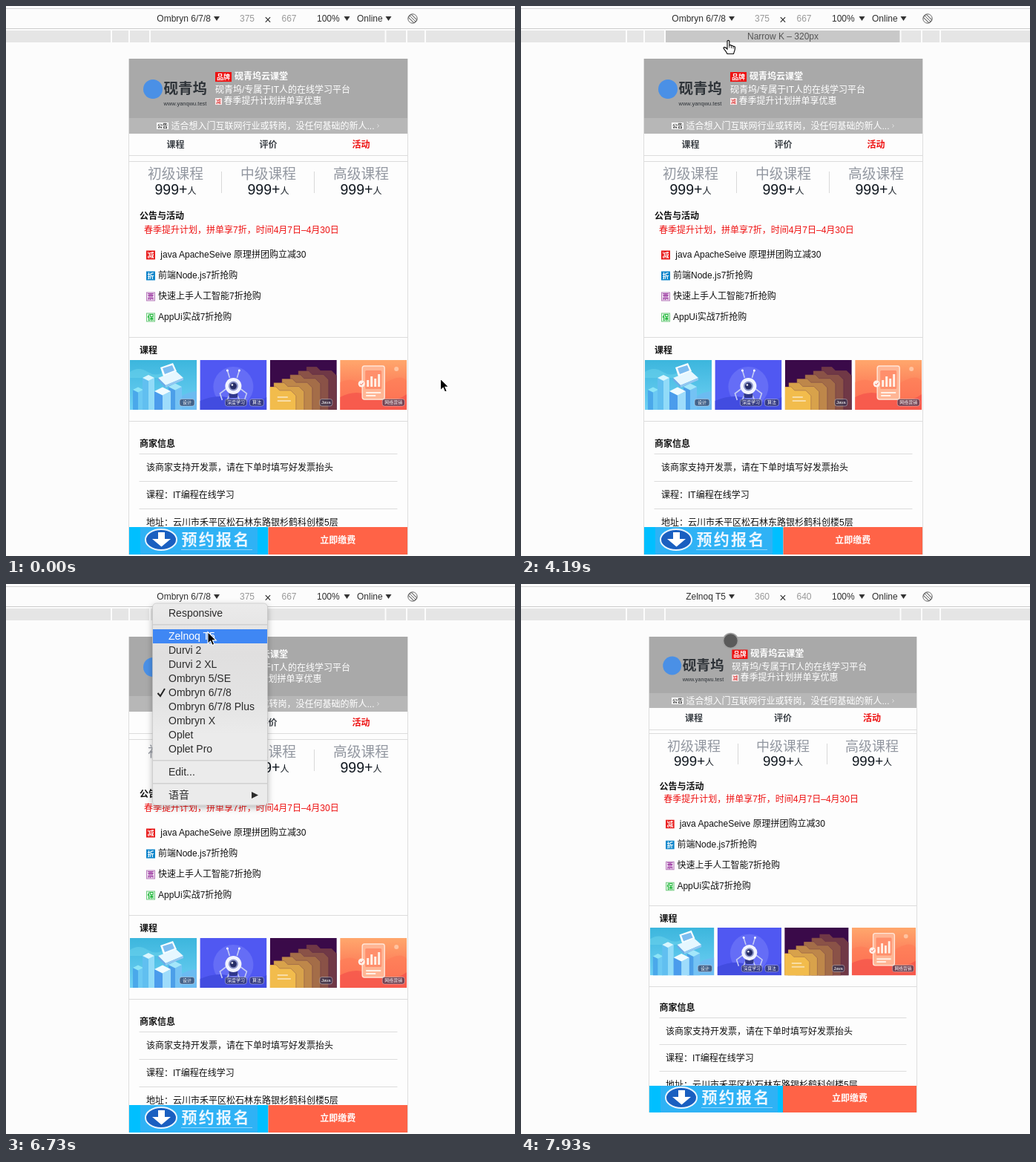
Recreate the animation shown at these times as an HTML page. Size 686 by 741 pixels, loop 8000 ms.

```html
<!DOCTYPE html>
<html lang="zh-CN">
<head>
<meta charset="utf-8">
<title>Device preview</title>
<style>
html, body { margin: 0; width: 100%; height: 100%; overflow: hidden; background: #fcfcfc; }
svg { display: block; width: 100%; height: 100%; }
text { font-family: "Liberation Sans", "Noto Sans CJK SC", "Noto Sans CJK", sans-serif; white-space: pre; }
</style>
</head>
<body>
<svg id="stage" viewBox="0 0 686 741"></svg>
<script>
const LOOP = 8000;
const $ = id => document.getElementById(id);

// y is the visual middle of the line
const text = (x, y, str, fill = '#111', size = 12, more = '') =>
  `<text x="${x}" y="${y + size * .37}" fill="${fill}" font-size="${size}" ${more}>${str}</text>`;
const rect = (x, y, w, h, fill, more = '') =>
  `<rect x="${x}" y="${y}" width="${w}" height="${h}" fill="${fill}" ${more}/>`;
const poly = (pts, fill, more = '') => `<polygon points="${pts}" fill="${fill}" ${more}/>`;
const circle = (x, y, r, fill, more = '') => `<circle cx="${x}" cy="${y}" r="${r}" fill="${fill}" ${more}/>`;
const path = (d, fill, more = '') => `<path d="${d}" fill="${fill}" ${more}/>`;
const group = (inner, more = '') => `<g ${more}>${inner}</g>`;
const down = (x, y) => poly(`${x},${y} ${x + 8},${y} ${x + 4},${y + 6}`, '#333');
const grad = (id, a, b) => `<linearGradient id="${id}" x2="0" y2="1"><stop stop-color="${a}"/><stop offset="1" stop-color="${b}"/></linearGradient>`;
const MID = 'text-anchor="middle"', BOLD = 'font-weight="700"', MEDIUM = 'font-weight="500"';

/* course pictures, 90 x 67 each */
const pill = (x, w, str) =>
  rect(x, 52.5, w, 9.5, '#2b3050', 'rx="3" fill-opacity=".65" stroke="#fff" stroke-opacity=".6" stroke-width=".6"') +
  text(x + w / 2, 57.2, str, '#fff', 6, MID);

const tower = (x, y, w, h, top, left, right) => {
  const q = w / 4, m = x + w / 2;
  return poly(`${x},${y} ${m},${y + q} ${m},${y + q + h} ${x},${y + h}`, left) +
    poly(`${m},${y + q} ${x + w},${y} ${x + w},${y + h} ${m},${y + q + h}`, right) +
    poly(`${x},${y} ${m},${y - q} ${x + w},${y} ${m},${y + q}`, top);
};

const design = () =>
  rect(0, 0, 90, 67, 'url(#sky)') +
  path('M0 16Q12 8 24 16T48 14V24H0z', '#6fd6ee', 'opacity=".5"') +
  path('M52 67Q66 44 90 42V67z', '#6fb8f3', 'opacity=".8"') +
  tower(4, 40, 14, 34, '#8de4f6', '#4aa8ea', '#6cc9f3') +
  tower(17, 24, 16, 50, '#d8f6ff', '#61bff0', '#91dbf8') +
  tower(52, 36, 18, 40, '#a4e6fa', '#4c9fe9', '#74c2f4') +
  tower(33, 42, 22, 40, '#f0fbff', '#4b9cec', '#9edcfb') +
  poly('38,24 62,15 72,24 48,34', '#e6f7ff') + poly('38,24 48,34 48,37 38,27', '#6da9e8') +
  poly('48,34 72,24 72,27 48,37', '#93c6f1') + poly('41,10 58,4 63,15 45,22', '#f6fdff') +
  poly('44,11 57,7 60,14 47,19', '#7cbcf0') + pill(67, 20, '设计');

const robot = () =>
  rect(0, 0, 90, 67, '#5058f2') + circle(45, 36, 27, '#656df6') +
  path('M0 55Q25 44 45 53T90 50V67H0z', '#424ce0') +
  path('M40 24L37 14M50 24L53 14M35 39L27 45L30 54M55 39L63 45L60 54M40 46L36 56M50 46L54 56', 'none', 'stroke="#c4ccf4" stroke-width="1.6"') +
  circle(37, 14, 1.5, '#fff') + circle(53, 14, 1.5, '#fff') +
  rect(39, 43, 12, 8, '#30378c', 'rx="3"') + circle(45, 35, 11, '#f1f3ff') +
  circle(45, 35, 6.5, '#8a93c8') + circle(45, 35, 4.5, '#262d66') + circle(43.5, 33.5, 1.3, '#fff') +
  pill(34, 29, '深度学习') + pill(67, 19, '算法');

const folders = () => {
  let out = rect(0, 0, 90, 67, '#3a0a49');
  for (let i = 5; i >= 0; i--) {
    const x = i * 11 - 6, y = 36 - i * 5.4, f = i / 5;
    const tone = `rgb(${242 - 130 * f},${188 - 132 * f},${76 - 6 * f})`;
    out += path(`M${x} 70V${y}H${x + 14}L${x + 19} ${y + 5}H${x + 34}L${x + 41} ${y + 12}V70z`, tone, 'stroke="#3a0a49" stroke-opacity=".25"');
  }
  return out + rect(10, 49, 14, 2, '#fff', 'opacity=".5"') + rect(10, 54, 18, 2, '#fff', 'opacity=".5"') + pill(67, 17, 'Java');
};

const market = () =>
  rect(0, 0, 90, 67, 'url(#dusk)') +
  path('M0 30Q14 22 28 32T62 30T90 28V67H0z', '#ff7c58', 'opacity=".6"') +
  path('M0 50Q22 38 45 50T90 46V67H0z', '#f6524a', 'opacity=".7"') +
  rect(30, 8, 30, 45, '#ffb594', 'rx="3" stroke="#ffe6d8" stroke-width="1.4"') +
  rect(34, 14, 22, 25, '#ff8f6c', 'rx="1.5"') +
  [9, 14, 11, 17].map((h, i) => rect(36 + i * 5, 36 - h, 3, h, '#fff0e6')).join('') +
  rect(35, 43, 20, 2, '#fff0e6') + rect(35, 47, 13, 2, '#fff0e6') +
  circle(29, 32, 4.5, '#fff1e9') + path('M27 32l1.6 1.7 2.8-3.2', 'none', 'stroke="#f2644e"') +
  circle(76, 12, 3, '#ffc3a0') + pill(57, 30, '网络营销');

const ART = [design, robot, folders, market];

/* the shop page: small = relaid out at the narrower root size */
function page(id, x, w, bottom, small) {
  const y = (a, b) => small ? b : a;
  const s = small ? .96 : 1;
  const X = a => x + a * s;
  const mid = x + w / 2;
  const line = (a, b, inset = 0) => rect(x + inset, y(a, b), w - 2 * inset, 1, '#dcdcdc');
  const tag = (a, yc, size, ch, fill, ink, edge = fill) =>
    rect(X(a) + .5, yc - size / 2 + .5, size - 1, size - 1, fill, `stroke="${edge}"`) +
    text(X(a) + size / 2, yc, ch, ink, size * .75, `${MID} ${BOLD}`);

  let out = rect(x, 71, w, bottom - 71, '#fdfdfd');

  out += rect(x, 71, w, y(80, 76), '#a9a9a9') + rect(x, y(151, 147), w, y(21, 20), '#b7b7b7') +
    circle(X(32), y(112, 110), 13 * s, '#4a90e6') +
    text(X(46.5), y(111, 109), '砚青坞', '#2e3338', 19.5 * s, BOLD) +
    text(X(46.5), y(131.5, 128.5), 'www.yanqwu.test', '#2e3338', 7.5 * s) +
    rect(X(116), y(89, 88.5), 22 * s, 13 * s, '#ee1111') +
    text(X(127), y(95.5, 95), '品牌', '#fff', 9 * s, `${MID} ${BOLD}`) +
    text(X(142), y(95, 94), '砚青坞云课堂', '#fff', 12, BOLD) +
    text(X(116), y(113, 112), '砚青坞/专属于IT人的在线学习平台', '#fff', 12, MEDIUM) +
    tag(116, y(128.5, 126.5), 9, '减', '#fbeeee', '#d44') +
    text(X(127.5), y(128, 126), '春季提升计划拼单享优惠', '#fff', 12, MEDIUM) +
    rect(203, y(157, 153), 16, 9, '#fff') + text(211, y(161.5, 157.5), '公告', '#333', 7, `${MID} ${BOLD}`) +
    text(222.5, y(162, 158), '适合想入门互联网行业或转岗，没任何基础的新人...', '#fff', 12, MEDIUM) +
    path(`M500.5 ${y(159.5, 155.5)}l2 2-2 2`, 'none', 'stroke="#e4e4e4"');

  ['课程', '评价', '活动'].forEach((name, i) => {
    const c = x + w * (2 * i + 1) / 6;
    out += text(c, y(187, 181), name, i == 2 ? '#ee1111' : '#3a3f45', 12, `${MID} ${BOLD}`) +
      text(c, y(226.5, 218.5), '初中高'[i] + '级课程', '#9297a0', 18.75 * s, MID) +
      text(c, y(247, 238.5), '999+<tspan font-size="12">人</tspan>', '#111820', 19.5 * s, MID);
    if (i) out += rect(Math.round(x + w * i / 3) - 1, y(223, 215), 1, y(29, 28), '#d8d8d8');
  });
  out += line(201, 196) + line(209, 201);

  out += text(X(14), y(283, 272.5), '公告与活动', '#111', 12, BOLD) +
    text(X(20), y(302, 290), '春季提升计划，拼单享7折，时间4月7日–4月30日', '#ee1111');
  [
    ['减', '#e81c1c', '#fff', ' java ApacheSeive 原理拼团购立减30'],
    ['折', '#0d86cb', '#fff', '前端Node.js7折抢购'],
    ['票', '#f0e4f2', '#9b35a0', '快速上手人工智能7折抢购', '#b87cbc'],
    ['保', '#e6f7e8', '#22b83c', 'AppUi实战7折抢购', '#72cc80'],
  ].forEach(([ch, fill, ink, str, edge], i) => {
    const row = y(335, 323) + i * 28;
    out += tag(23, row + .5, 12 * s, ch, fill, ink, edge) + text(X(39), row, str);
  });

  out += line(446, 433) + text(X(14), y(464, 451), '课程', '#111', 12, BOLD);
  ART.forEach((art, i) => {
    const left = small ? 174 + i * 90.6 : (w == 375 ? 167 : 166.3) + i * 94.4;
    out += `<use href="#art${i}" transform="translate(${left} ${y(477, 463)}) scale(${s})"/>`;
  });
  out += line(559, 542);

  out += text(X(14), y(590, 571), '商家信息', '#111', 12, BOLD);
  ['该商家支持开发票，请在下单时填写好发票抬头', '课程：IT编程在线学习', '地址：云川市禾平区松石林东路银杉鹤科创楼5层'].forEach((str, i) => {
    out += line(603 + i * 37, 584 + i * 36, 13.5) + text(X(23), y(622, 603) + i * y(37, 36), str);
  });

  const top = bottom - 37 + (small ? 1 : 0), fy = bottom - 20;
  out += rect(x, top, w / 2, 37, '#00bfff') + rect(x + 15, top, 158, 37, '#2fb2f5') +
    `<ellipse cx="${x + 43}" cy="${fy}" rx="21" ry="14" fill="#1a5fc0" stroke="#e8f5ff" stroke-width="2"/>` +
    path(`M${x + 39} ${fy - 10}h9v9h8l-12.500 10.500-12.500-10.500h8z`, '#fff') +
    rect(x + 70, fy + 13, 96, 1, '#8fd4fa') +
    text(x + 70.5, fy - 1, '预约报名', '#eaf6ff', 21, `${BOLD} letter-spacing="2.3"`) +
    rect(mid, top, w / 2, 37, '#ff6347') +
    text(x + w * .75, bottom - 19, '立即缴费', '#fff', 12, `${MID} ${BOLD}`);

  out += path(`M${x - .5} 71V${bottom}M${x + w + .5} 71V${bottom}`, 'none', 'stroke="#dedede"');
  return `<clipPath id="${id}Clip">${rect(x - 1, 70.5, w + 2, bottom - 70.5, '#000')}</clipPath>` +
    group(out, `id="${id}" clip-path="url(#${id}Clip)"`);
}

/* browser chrome */
function chrome() {
  let out = rect(0, 3, 686, 1, '#d4d4d4') + rect(0, 30, 686, 1, '#cccccc') + rect(0, 33, 686, 16, '#e5e5e5') +
    group(rect(195, 33, 316, 16, '#c8c8c8'), 'id="band"') +
    text(353, 41, 'Narrow K – 320px', '#555', 12, `${MID} id="bandName"`);
  [142, 166, 194, 511.5, 540, 565].forEach(x => out += rect(x - 1, 33, 2, 16, '#fcfcfc'));
  out += text(276, 17, '', '#303030', 12, 'text-anchor="end" id="device"') + down(280, 14) +
    text(325, 17, '', '#999', 12, `${MID} id="wide"`) + text(353, 18, '×', '#333', 16, MID) +
    text(381.5, 17, '', '#999', 12, `${MID} id="tall"`) +
    text(419, 17, '100%', '#303030') + down(455.5, 14) + text(473, 17, 'Online', '#303030') + down(511.5, 14) +
    group(circle(548, 17, 6.2, 'none') + rect(545.2, 11.5, 5.6, 11, 'none', 'rx="1" transform="rotate(-45 548 17)"') +
      path('M544 13l8 8', 'none'), 'stroke="#666"');
  return out;
}

/* device menu */
const ROWS = ['Responsive', 'Zelnoq T5', 'Durvi 2', 'Durvi 2 XL', 'Ombryn 5/SE', 'Ombryn 6/7/8', 'Ombryn 6/7/8 Plus',
  'Ombryn X', 'Oplet', 'Oplet Pro', 'Edit...', '语音'];
const rowY = i => i == 0 ? 39 : i < 10 ? 51 + i * 19 : 253 + (i - 10) * 31;

function menu() {
  let out = rect(197.5, 26, 155, 272, 'url(#glass)', 'rx="5" stroke="#bdbdbd" stroke-width=".6" filter="url(#shade)"') +
    rect(198, 0, 154, 19, '#3f87f4', 'id="hot"');
  [55, 238, 269].forEach(y => out += rect(198, y - 1, 154, 1.5, '#d0d0d0'));
  ROWS.forEach((name, i) => out += text(219, rowY(i), name, '#2b2b2b', 14, `id="row${i}"`));
  return out + path('M204.500 147l3.500 4 6-10', 'none', 'stroke="#222" stroke-width="2"') + poly('331,280 340,284.500 331,289', '#2b2b2b');
}

const ARROW = path('M0 0V15.800L3.600 12.500L6 18L8.800 16.800L6.400 11.400H11.300z', '#000', 'stroke="#fff" stroke-width="1.1"');
const HAND = path('M-1.500 1C-1.500-.6 1.300-.6 1.300 1V6.500C2.200 5.600 4 6 4 7.200C5 6.400 6.500 7 6.500 8.200C7.600 7.600 9 8.200 9 9.600C9 14 7.500 15 7 18H-1.500C-2.500 15-5.500 12.500-6.500 10.200C-6.500 8.500-4 8.600-1.500 11.500z',
  '#fff', 'stroke="#111" stroke-width="1.2"') + path('M1.300 7v3M4 8v2.500M6.500 9v2', 'none', 'stroke="#111" stroke-width=".8"');

$('stage').innerHTML =
  '<defs>' + grad('sky', '#3cb6dd', '#6fd0f4') + grad('dusk', '#ffa76c', '#fb5c4c') +
  '<linearGradient id="glass" x2="0" y2="1"><stop stop-color="#ebebeb"/><stop offset=".25" stop-color="#e0dfdf"/>' +
  '<stop offset=".48" stop-color="#e3e3e3"/><stop offset=".65" stop-color="#ebebeb"/><stop offset="1" stop-color="#ebebeb"/></linearGradient>' +
  '<filter id="shade" x="-20%" y="-20%" width="140%" height="140%"><feDropShadow dx="0" dy="3" stdDeviation="4" flood-opacity=".28"/></filter>' +
  '<clipPath id="card">' + rect(0, 0, 90, 67, '#000') + '</clipPath>' +
  ART.map((art, i) => group(art(), `id="art${i}" clip-path="url(#card)"`)).join('') + '</defs>' +
  rect(0, 0, 686, 741, '#fcfcfc') + chrome() +
  page('wider', 166, 375, 739, false) + page('narrow', 173, 360, 712, false) + page('relaid', 173, 360, 712, true) +
  rect(177, 0, 0, 3, '#c6c6c6', 'id="scroll" rx="1"') +
  group(menu(), 'id="menu"') +
  group(ARROW, 'id="arrow"') + group(HAND, 'id="hand"') +
  group(circle(0, 0, 10, '#5a5a5a', 'stroke="#a2a2a2" stroke-width="1.6"'), 'id="touch"');

// time, x, y: the pointer jumps at each time and then rests
const TRAIL = [
  [0, 585.5, 502], [300, 588, 520], [450, 588, 553], [750, 587, 576], [900, 562, 563], [1050, 546, 490], [1200, 505, 439],
  [1500, 375, 265], [1650, 358, 200], [1800, 282, 83], [1950, 268, 40], [2100, 253, 14], [2250, 262, 1], [2400, 281, 21],
  [2550, 282, 24], [2700, 281, 28], [2850, 281, 29], [3000, 282, 26], [3150, 281, 22], [3300, 281, 21],
  [3750, 280, 35], [3890, 280, 46], [4190, 279.5, 46.5], [4340, 281, 52], [4490, 280, 50], [4640, 281, 30], [4790, 281, 26],
  [4940, 282, 23.5], [5830, 282, 30], [5980, 283, 38], [6130, 281, 46], [6280, 278, 54], [6430, 275, 60],
  [6580, 273, 64], [6730, 272, 64.5], [7780, 277, 75], [7930, 282.5, 76.5],
];

const show = (id, on) => $(id).setAttribute('display', on ? 'inline' : 'none');
const set = (id, attrs) => { for (const k in attrs) $(id).setAttribute(k, attrs[k]); };

function draw(t) {
  const within = (a, b) => t >= a && t < b;
  const [, x, y] = TRAIL.findLast(p => p[0] <= t);

  const changed = t >= 7030, relaid = t >= 7480;
  show('wider', !changed);
  show('narrow', changed && !relaid);
  show('relaid', relaid);
  $('device').textContent = changed ? ROWS[1] : ROWS[5];
  $('wide').textContent = changed ? 360 : 375;
  $('tall').textContent = changed ? 640 : 667;

  show('scroll', within(7030, 7930));
  set('scroll', { y: relaid ? 534 : 550, width: relaid ? 281 : 274, opacity: t < 7780 ? 1 : .5 });

  set('band', { opacity: within(3890, 4340) ? 1 : within(3750, 4490) ? .5 : 0 });
  show('bandName', within(3890, 4340));

  const open = within(5380, 6880);
  const hot = open ? ROWS.findIndex((_, i) => Math.abs(y - rowY(i)) <= 9.5) : -1;
  show('menu', open);
  show('hot', hot >= 0);
  if (hot >= 0) set('hot', { y: rowY(hot) - 9 });
  ROWS.forEach((_, i) => set('row' + i, { fill: i == hot ? '#fff' : '#2b2b2b' }));

  const kind = within(3890, 4340) ? 'hand' : t >= 7780 ? 'touch' : 'arrow';
  ['arrow', 'hand', 'touch'].forEach(k => show(k, k == kind));
  set(kind, { transform: `translate(${x} ${y})` });
}

const start = performance.now();
function tick() {
  draw((performance.now() - start) % LOOP);
  requestAnimationFrame(tick);
}
tick();
</script>
</body>
</html>
```
